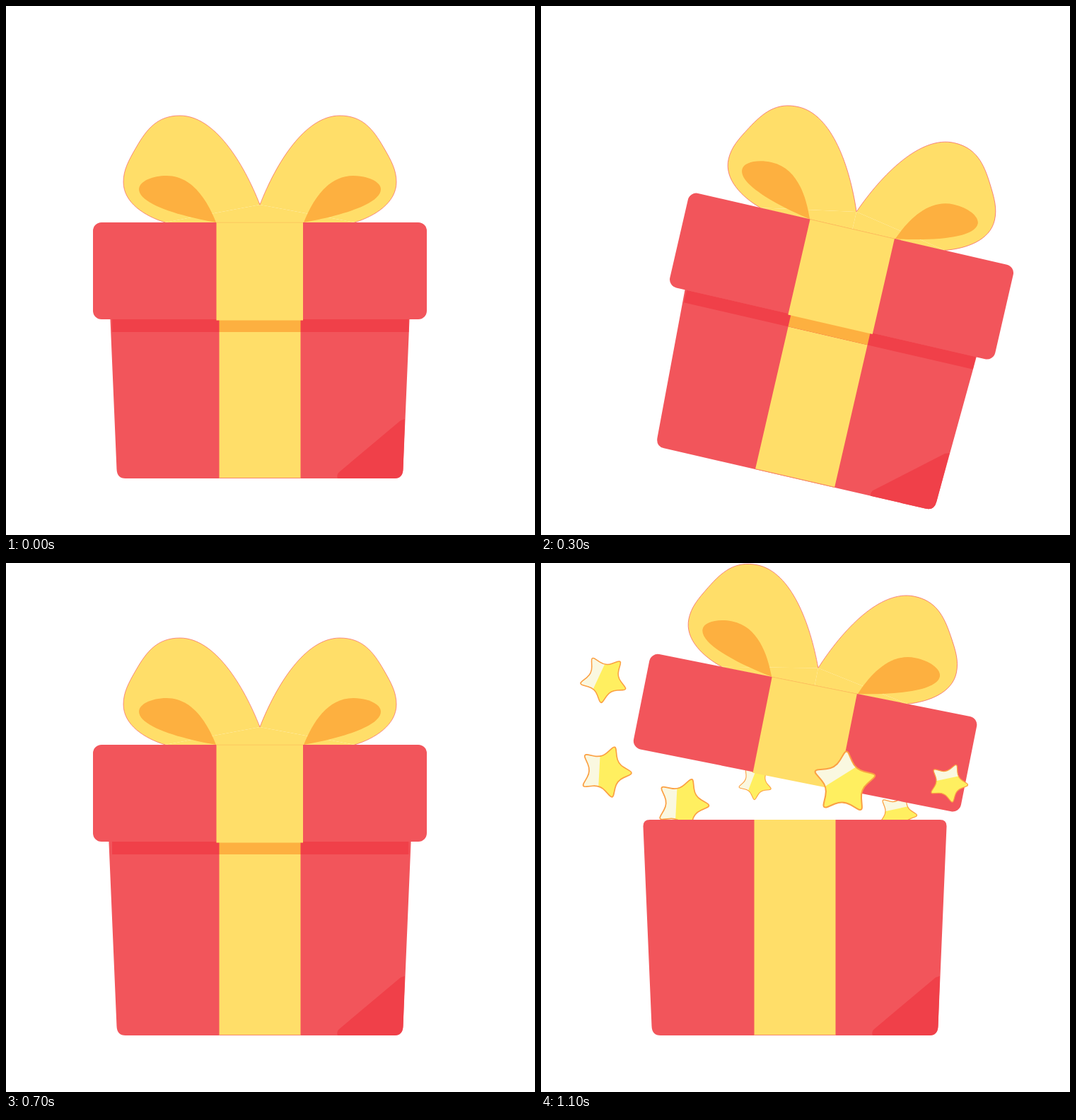
An HTML page for the animation above (1200 ms loop, 748 px wide and 748 px high).

```html
<!DOCTYPE html>
<html lang="en">
<head>
<meta charset="utf-8">
<title>Gift box</title>
<style>
  html, body { margin: 0; width: 100%; height: 100%; overflow: hidden; background: #fff; }
  svg { display: block; width: 100%; height: 100%; }
  .red { fill: #f2555b; }
  .dark { fill: #f04049; }
  .yellow { fill: #ffde69; }
  .orange { fill: #fdb040; }
</style>
</head>
<body>
<svg viewBox="0 0 748 748">
  <defs>
    <path id="starShape"/>
    <clipPath id="starClip"><use href="#starShape"/></clipPath>
    <g id="star">
      <use href="#starShape" fill="#ffef60"/>
      <rect x="-1.2" y="-1.2" width=".97" height="2.4" fill="#faf8e0" clip-path="url(#starClip)"/>
      <use href="#starShape" fill="none" stroke="#fba043" stroke-width=".045"/>
    </g>
    <g id="loop">
      <path class="yellow" stroke="#f4646a" stroke-width=".7" d="M359 281C336 222 295 155 246 155C214 155 199 174 184 200C173 219 166 232 166 249C166 278 196 297 225 306"/>
      <path class="yellow" d="M225 306L359 281V306.5H225Z"/>
      <path class="orange" d="M297 306C285 276 264 240 227 240C205 240 188 249 188 259C188 279 240 296 297 306Z"/>
    </g>
  </defs>
  <g id="gift">
    <g id="backStars"></g>
    <g id="body">
      <path class="red" d="M154 363H564Q574 363 573.5 373L561.5 655Q561 668 549 668H169Q157 668 156.5 655L144.5 373Q144 363 154 363Z"/>
      <path class="yellow" d="M301.5 363H416.5V668H301.5Z"/>
      <path class="dark" d="M564 584L558 586L470 660Q467 664 469 668H549Q561 668 561.5 655Z"/>
      <path d="M301.5 667.5H416.5" stroke="#f4646a" stroke-width=".7"/>
    </g>
    <g id="lid">
      <g id="shade">
        <path class="dark" d="M150 443H569.5V461H150Z"/>
        <path class="orange" d="M301.5 443H416.5V461H301.5Z"/>
      </g>
      <use href="#loop"/>
      <use href="#loop" transform="matrix(-1 0 0 1 718 0)"/>
      <rect class="red" x="123" y="306" width="472" height="137" rx="12"/>
      <path class="yellow" d="M297.5 306H420V444.5H297.5Z"/>
      <path d="M297.5 306.2H420" stroke="#fdc45c" stroke-width=".8"/>
    </g>
    <g id="frontStars"></g>
  </g>
</svg>
<script>
const STEP = 100, STEPS = 12, OPEN_STEP = 8, BURST_STEP = 9;
const TILTS = [0, 10, -12.1, 13, -15, 0];
// Lid poses from step 6 on: dx, dy, angle; the last one holds.
const LID_POSES = [[0, 20, 0], [0, -49, 0], [14, -95, 6], [28, -133, 11.3]];

// Each star goes from one state to another: x, y, radius, angle.
const FRONT = [
  [[86, 195, 40, 24], [89, 164, 34, 25]],
  [[150, 295, 50, 4], [91, 295, 37.5, 3]],
  [[377, 331, 36, 58], [429, 311, 45, 58]],
  [[502, 325, 27.5, 36], [576, 311, 28, 78]]
];
const BACK = [
  [[260, 412, 36, 3], [200, 341, 38, 3]],
  [[330, 390, 22, 21], [303, 311, 24, 21]],
  [[440, 400, 27, 78], [504, 354, 28, 78]]
];

const $ = id => document.getElementById(id);
const mix = (a, b, t) => a + (b - a) * t;

function starPath() {
  const points = Array.from({ length: 10 }, (_, i) => {
    const r = i % 2 ? .55 : 1.07, a = i * Math.PI / 5;
    return [r * Math.cos(a), r * Math.sin(a)];
  });
  const toward = (p, q, t) => p.map((v, i) => mix(v, q[i], t).toFixed(3)).join(" ");
  return points.map((p, i) => {
    const round = i % 2 ? .4 : .26;
    const before = points[(i + 9) % 10], after = points[(i + 1) % 10];
    return `${i ? "L" : "M"}${toward(p, before, round)}Q${toward(p, p, 0)} ${toward(p, after, round)}`;
  }).join("") + "Z";
}

function addStars(id, stars) {
  return stars.map(([from, to]) => {
    const node = document.createElementNS("http://www.w3.org/2000/svg", "use");
    node.setAttribute("href", "#star");
    $(id).append(node);
    return { node, from, to };
  });
}

$("starShape").setAttribute("d", starPath());
const stars = [...addStars("backStars", BACK), ...addStars("frontStars", FRONT)];

function draw(ms) {
  const step = Math.floor(ms / STEP) % STEPS;
  $("gift").setAttribute("transform", `rotate(${TILTS[step] || 0} 359 668)`);

  const [dx, dy, angle] = step < 6 ? [0, 0, 0] : LID_POSES[Math.min(step - 6, 3)];
  $("lid").setAttribute("transform", `translate(${dx} ${dy}) rotate(${angle} 359 306)`);
  $("shade").style.display = step < OPEN_STEP ? "" : "none";

  const flight = (step - BURST_STEP) / 2;
  for (const { node, from, to } of stars) {
    node.style.display = flight < 0 ? "none" : "";
    const [x, y, r, turn] = from.map((v, i) => mix(v, to[i], flight));
    node.setAttribute("transform", `translate(${x} ${y}) rotate(${turn}) scale(${r})`);
  }
}

const start = performance.now();
function tick() {
  draw(performance.now() - start);
  requestAnimationFrame(tick);
}
tick();
</script>
</body>
</html>
```
